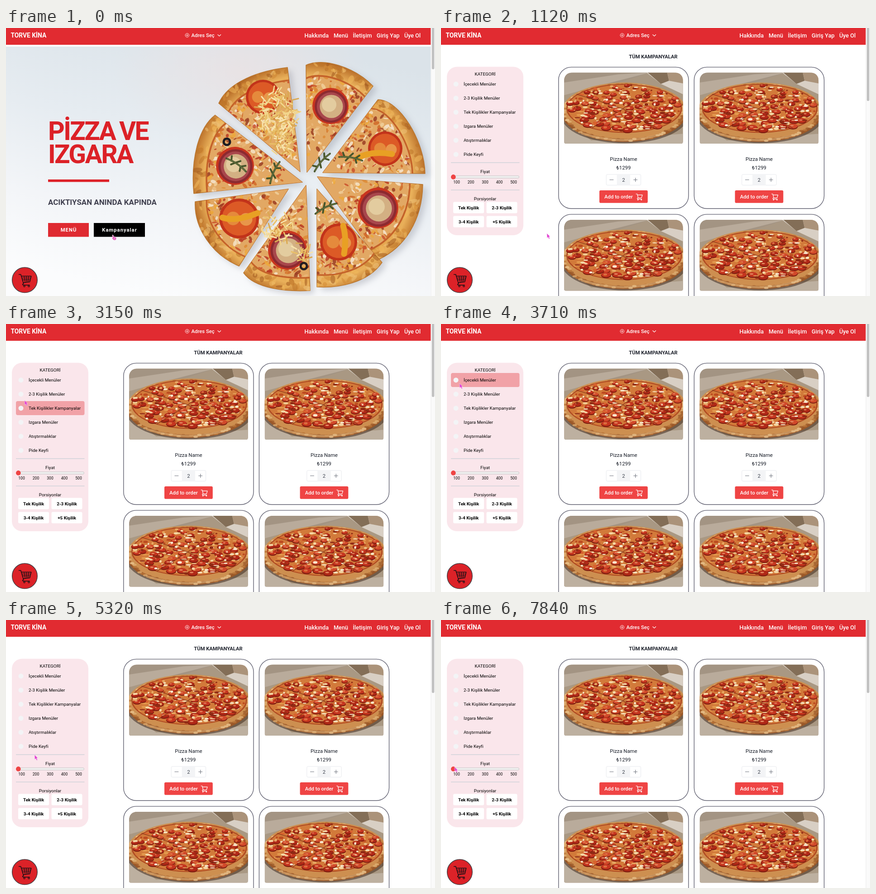
An HTML page for the animation above (7.91 s loop, 948 px wide and 591 px high).

```html
<!DOCTYPE html>
<html lang="tr">
<head>
<meta charset="utf-8">
<title>Pizza menu</title>
<style>
  html, body { margin: 0; width: 100%; height: 100%; overflow: hidden; background: #fff; }
  svg { display: block; width: 948px; height: 591px; font-family: Roboto, Arial, sans-serif; }
  .mid { text-anchor: middle; }
  .med { font-weight: 500; }
  .bold { font-weight: 700; }
  .title { font-weight: 700; font-stretch: 75%; letter-spacing: -2.6px; word-spacing: -3px; }
</style>
</head>
<body>
<svg id="stage" viewBox="0 0 948 591" xmlns="http://www.w3.org/2000/svg"></svg>
<script>
const LOOP = 7910, STEP = 70;
const OPEN_AT = 350, LOADED_AT = 1050;
const RED = '#e12b31', BRIGHT = '#ef4444';

function seeded(seed) {
  return () => (seed = (seed * 16807) % 2147483647) / 2147483647;
}
const repeat = (n, fn) => Array.from({ length: n }, (_, i) => fn(i)).join('');
const pick = (list, rnd) => list[Math.floor(rnd() * list.length)];
const rect = (x, y, w, h, fill, r = 0, more = '') =>
  `<rect x="${x}" y="${y}" width="${w}" height="${h}" rx="${r}" fill="${fill}" ${more}/>`;
const disc = (x, y, r, fill, more = '') =>
  `<circle cx="${x}" cy="${y}" r="${r}" fill="${fill}" ${more}/>`;
const oval = (x, y, rx, ry, fill, more = '') =>
  `<ellipse cx="${x}" cy="${y}" rx="${rx}" ry="${ry}" fill="${fill}" ${more}/>`;
const path = (d, fill, more = '') => `<path d="${d}" fill="${fill}" ${more}/>`;
const line = (d, color, w, more = '') =>
  path(d, 'none', `stroke="${color}" stroke-width="${w}" stroke-linecap="round" stroke-linejoin="round" ${more}`);
const text = (x, y, size, str, cls = '', fill = '#000', more = '') =>
  `<text x="${x}" y="${y}" font-size="${size}" class="${cls}" fill="${fill}" ${more}>${str}</text>`;

// ---- Shared parts ----
function header() {
  const links = [[659.5, 'Hakkında'], [724, 'Menü'], [766.5, 'İletişim'], [819, 'Giriş Yap'], [880, 'Üye Ol']];
  return rect(0, 0, 938.5, 37, RED) +
    text(10.5, 21, 13.8, 'TORVE KİNA', 'bold', '#fff') +
    disc(400.3, 16, 4.2, 'none', 'stroke="#fff" stroke-width=".9"') +
    line('M398.3 16h4M400.3 14v4', '#fff', .9) +
    text(409.5, 20, 11.3, 'Adres Seç', 'med', '#fff') +
    line('M468 14.7l3.3 3.2 3.3-3.2', '#fff', 1.2) +
    links.map(([x, s]) => text(x, 20.5, 12.7, s, 'med', '#fff')).join('');
}

const scrollbar = h => rect(939, 0, 9, 591, '#fafafa') + rect(938.6, 0, .8, 591, '#e6e6e6') +
  rect(941, -4, 5.5, h + 4, '#c1c1c1', 2.7);

function basket() {
  return disc(41.4, 555.8, 27.8, '#dc2228', 'stroke="#4a4045" stroke-width="1.5"') +
    line('M28.5 543.5h4.2l6.2 20.5M33.7 547.2h22l-3.2 12.6-14.6 1.8M38.9 564c-3 .3-3 3 0 3h13', '#151014', 1.5) +
    line('M35 551.3h19.5M36.2 555.4h17.3M40 547.5l2.4 13.5M45 547.5l.7 13M50 547.5l-1.2 12.5', '#151014', 1.1) +
    disc(40.5, 569.3, 1.7, 'none', 'stroke="#151014" stroke-width="1.2"') +
    disc(50.5, 569.3, 1.7, 'none', 'stroke="#151014" stroke-width="1.2"');
}

// ---- Hero ----
// tip, first corner, two curve handles, second corner
const SLICES = [
  [650, 317, 470, 166, 492, 118, 560, 94, 622, 87],
  [665, 318, 663, 82, 700, 64, 770, 86, 811, 128],
  [700, 319, 822, 158, 870, 158, 925, 250, 926, 321],
  [688, 328, 921, 345, 920, 425, 880, 485, 822, 511],
  [687, 355, 831, 517, 800, 562, 735, 574, 687, 571],
  [663, 347, 525, 540, 550, 575, 620, 582, 672, 579],
  [624, 355, 418, 383, 415, 440, 455, 500, 515, 525],
  [655, 340, 415, 365, 408, 290, 425, 220, 462, 192]
];

function wedge(s, k) {
  const p = s.map((v, i) => (s[i % 2] + (v - s[i % 2]) * k).toFixed(1));
  return `M${p[0]} ${p[1]}L${p[2]} ${p[3]}C${p.slice(4).join(' ')}Z`;
}

// A point on the outer curve at u, pulled toward the tip by k.
function along(s, u, k) {
  const v = 1 - u;
  return [0, 1].map(j => {
    const edge = v * v * v * s[2 + j] + 3 * v * v * u * s[4 + j] + 3 * v * u * u * s[6 + j] + u * u * u * s[8 + j];
    return (s[j] + (edge - s[j]) * k).toFixed(1);
  });
}

function slice(s, i) {
  const rnd = seeded(91 + i * 77);
  const spots = ['#d06a28', '#f5e3c6', '#b83a24', '#eda83c', '#f6e6cf', '#9c3f24', '#f0cf9a', '#dc8a35', '#c9502c', '#e9b778'];
  const browns = ['#a55c20', '#efc277', '#d48a36', '#f0b95c', '#bd7529'];
  const blob = (u, k, rx, ry, fill, alpha) => {
    const [x, y] = along(s, u, k);
    return oval(x, y, rx.toFixed(1), ry.toFixed(1), fill,
      `opacity="${alpha}" transform="rotate(${Math.round(rnd() * 180)} ${x} ${y})"`);
  };
  const bits = repeat(170, () => blob(rnd(), .1 + Math.sqrt(rnd()) * .78, 2 + rnd() * 6, 1.2 + rnd() * 3, pick(spots, rnd), .85));
  const bake = repeat(28, () => blob(rnd(), .89 + rnd() * .1, 4 + rnd() * 8, 2 + rnd() * 4, pick(browns, rnd), .55));
  return `<clipPath id="o${i}">${path(wedge(s, 1), '#000')}</clipPath>
    <clipPath id="w${i}">${path(wedge(s, .87), '#000')}</clipPath>` +
    path(wedge(s, 1), 'url(#crust)', 'stroke="#b9762f" stroke-width="1.5" stroke-linejoin="round"') +
    `<g clip-path="url(#o${i})">${bake}</g>` +
    path(wedge(s, .885), '#c4622a') +
    `<g clip-path="url(#w${i})">${path(wedge(s, .87), '#e2a864')}${bits}</g>`;
}

function salami(x, y, r) {
  return disc(x, y, r, '#c9351f') + disc(x + 1, y + 1, r * .9, '#8c2a30') + disc(x + 1, y + 1, r * .78, '#a8474c') +
    disc(x + 2, y + 1, r * .64, '#d3b083') + disc(x - 3, y - 3, r * .4, '#e3cc9f');
}
const tomato = (x, y, r) => disc(x, y, r, '#c2331a') + disc(x, y, r * .86, '#dc5a26') +
  disc(x - r * .3, y, r * .34, '#e58a3c') + disc(x + r * .35, y + 2, r * .32, '#e8964a');

function shreds(cx, cy, rx, ry, n, seed) {
  const rnd = seeded(seed);
  return repeat(n, () => {
    const a = rnd() * 6.28, d = Math.sqrt(rnd());
    const x = cx + Math.cos(a) * d * rx, y = cy + Math.sin(a) * d * ry, b = rnd() * 6.28;
    return line(`M${x.toFixed(1)} ${y.toFixed(1)}l${(Math.cos(b) * 13).toFixed(1)} ${(Math.sin(b) * 13).toFixed(1)}`,
      pick(['#f2d58c', '#e9bf68', '#f7e3ac', '#dba951'], rnd), 3);
  });
}

function leaf(x, y, turn) {
  return `<g transform="translate(${x} ${y}) rotate(${turn})">` +
    line('M-26 3Q0-4 26 2M-14 1l-5-9M-4-1l7-9M-4-1l-6 9M10 0l8-8M10 0l4 9', '#47552c', 4) +
    line('M-24 3Q0-4 25 2', '#77824a', 1.2) + '</g>';
}

function hero() {
  const toppings = tomato(568, 152, 38) + shreds(600, 190, 42, 52, 150, 17) + shreds(612, 255, 25, 34, 50, 23) +
    salami(717, 172, 40) + tomato(838, 266, 38) + salami(506, 304, 42) + tomato(515, 420, 44) +
    salami(822, 397, 45) + salami(622, 490, 43) + tomato(735, 472, 41) +
    shreds(600, 440, 36, 30, 45, 51) + shreds(655, 490, 18, 25, 18, 5) +
    line('M775 288q30-18 78-10M478 418q30 10 78-10M745 436q8 28 2 62', '#e8a024', 13) +
    disc(488, 251, 7, 'none', 'stroke="#1d1c22" stroke-width="5"') +
    disc(658, 525, 7, 'none', 'stroke="#241d20" stroke-width="5"') +
    leaf(510, 300, 35) + leaf(592, 318, -65) + leaf(697, 295, -48) + leaf(762, 286, 10) + leaf(706, 396, -25);
  const button = (x, w, fill, s) => rect(x, 430, w, 30.5, fill) +
    text(x + w / 2 + .5, 448.7, 11.3, s, 'mid bold', '#fff', 'letter-spacing="1"');
  return rect(0, 37, 938.5, 4, '#fff') + rect(0, 41, 938.5, 550, 'url(#wall)') +
    rect(0, 41, 938.5, 550, 'url(#glow)') +
    `<g filter="url(#soft)" opacity=".38" transform="translate(9 7)">${SLICES.map(s => path(wedge(s, 1), '#8b8f9c')).join('')}</g>` +
    SLICES.map(slice).join('') + toppings +
    text(93, 247, 57, 'PİZZA VE', 'title', '#dc2127') + text(93, 297.5, 57, 'IZGARA', 'title', '#dc2127') +
    rect(93, 334, 135, 5.5, '#dd2229') +
    text(93, 390, 16.9, 'ACIKTIYSAN ANINDA KAPINDA', 'bold', '#414150') +
    button(93, 90, '#df2a31', 'MENÜ') + button(194, 113, '#000', 'Kampanyalar');
}

// ---- Campaign page ----
const ROWS = ['İçecekli Menüler', '2-3 Kişilik Menüler', 'Tek Kişilikler Kampanyalar', 'Izgara Menüler', 'Atıştırmalıklar', 'Pide Keyfi'];

function sidebar() {
  const rows = ROWS.map((s, i) => disc(33, 123.7 + i * 31, 5.5, '#f3f4f6') + text(50, 127.2 + i * 31, 9.9, s)).join('');
  const ticks = [100, 200, 300, 400, 500].map((n, i) => text(34.5 + i * 31.5, 342.7, 8.5, n, 'mid')).join('');
  const sizes = ['Tek Kişilik', '2-3 Kişilik', '3-4 Kişilik', '+5 Kişilik'].map((s, i) => {
    const x = 27 + (i % 2) * 73.5, y = 383.5 + (i >> 1) * 31;
    return rect(x, y, 68, 25, '#fff', 3) + text(x + 34, y + 16, 9.9, s, 'mid bold');
  }).join('');
  return rect(13, 85.5, 169, 371.5, '#fae6eb', 22) +
    rect(22, 108, 151.5, 31, '#f1a2a7', 4, 'id="hover"') +
    text(97.5, 104.5, 9.9, 'KATEGORİ', 'mid') + rows +
    rect(22, 296, 151.5, 1.6, '#d3d4da') + text(97.5, 319.5, 9.9, 'Fiyat', 'mid') +
    rect(22.5, 326, 150, 5, '#f1f1f1', 2.5, 'stroke="#b9b9b9" stroke-width=".8"') +
    disc(27.3, 328.4, 5.3, BRIGHT) + ticks +
    rect(22, 356.5, 151.5, 1.6, '#d3d4da') + text(97.5, 380, 9.9, 'Porsiyonlar', 'mid') + sizes;
}

function card(cx, w, y, photo) {
  const left = cx - 38.2, sign = '#70757f';
  return `<g transform="translate(0 ${y})">` +
    rect(cx - w / 2, .7, w, 311.8, '#fff', 28, 'stroke="#626272" stroke-width="1.4"') +
    (photo ? `<use href="#photo" x="${cx - 131.5}" y="12.5"/>` : '') +
    text(cx, 207, 11.3, 'Pizza Name', 'mid', '#161b26') + text(cx, 226.5, 11.3, '₺1299', 'mid', '#161b26') +
    rect(left, 237.3, 76.4, 23.6, '#fff', 2.5, 'stroke="#e5e7eb" stroke-width=".9"') +
    rect(left + 23.5, 237.3, 29.4, 23.6, '#f3f4f6') +
    line(`M${left + 7.7} 249h8M${left + 60.5} 249h8M${left + 64.5} 245v8`, sign, 1.1) +
    text(cx, 253, 11.3, '2', 'mid', '#3c424d') +
    rect(cx - 53.4, 272.3, 106.8, 27.8, BRIGHT, 2.8) +
    text(cx - 42.3, 290, 11.3, 'Add to order', 'med', '#fff') +
    line(`M${cx + 27.5} 280.3h2.6l2.3 8.6h7.2l2-6.4h-10.6M${cx + 32.4} 288.9c-2.8.2-2.8 2.7 0 2.7h8`, '#fff', 1.2) +
    disc(cx + 31.8, 293.3, 1.2, '#fff') + disc(cx + 39.4, 293.3, 1.2, '#fff') + '</g>';
}

function cards(centers, w, photo) {
  return [85.7, 410.2].map(y => centers.map(cx => card(cx, w, y, photo)).join('')).join('');
}

function photo() {
  const rnd = seeded(4242);
  // Even spread over the cheese, by the golden angle, with a little jitter.
  const scatter = (n, draw) => repeat(n, i => {
    const a = i * 2.39996 + rnd() * .3, d = Math.sqrt((i + .3 + rnd() * .4) / n);
    return draw(+(133 + Math.cos(a) * d * 124).toFixed(1), +(78 + Math.sin(a) * d * 51).toFixed(1));
  });
  const flecks = (n, colors) => scatter(n, (x, y) =>
    oval(x, y, (1.5 + rnd() * 5).toFixed(1), (.8 + rnd() * 2).toFixed(1), pick(colors, rnd)));
  const meat = scatter(74, (x, y) => {
    const k = .6 + y / 170;
    return oval(x, y + 1.2, (8.6 * k).toFixed(1), (4.8 * k).toFixed(1), '#7c1c10') +
      oval(x, y, (8 * k).toFixed(1), (4 * k).toFixed(1), pick(['#c5351f', '#b02817', '#d1492a'], rnd)) +
      oval(x - 2, y - 1, 3 * k, 1.1 * k, '#e58a62');
  });
  const bake = repeat(90, i => {
    const a = i / 90 * 6.283, k = .97 + rnd() * .06;
    return oval((133 + Math.cos(a) * 132 * k).toFixed(1), (88 + Math.sin(a) * 61 * k).toFixed(1), 5, 2.5,
      pick(['#dfb075', '#9c5a2a', '#ecc993', '#b87539'], rnd), 'opacity=".75"');
  });
  return `<clipPath id="frame">${path('M20 0H243Q263 0 263 20V152Q263 157 258 157H5Q0 157 0 152V20Q0 0 20 0Z', '#000')}</clipPath>
    <g id="photo"><g clip-path="url(#frame)">` +
    rect(0, 0, 263, 157, '#a99883') +
    path('M0 0H190L110 26 0 48Z', '#a39483') + path('M0 22L120 4 190 0 80 28 0 50Z', '#b9ab9b') +
    path('M182 0H263V48L214 25Z', '#d8cfc4') + path('M185 0H228L232 18 214 25Z', '#836e57') +
    path('M228 0H263V24L232 18Z', '#ab937a') + path('M0 100L60 150 263 135V157H0Z', '#bdb0a0') +
    oval(134, 95, 140, 61, '#4c3526', 'opacity=".6"') +
    oval(133, 88, 138, 65, '#9a5828') + oval(133, 84, 137, 62, '#cd8f50') + bake +
    oval(133, 79, 128, 54, '#b04a22') + oval(133, 79, 125, 52, '#d27a3a') +
    flecks(150, ['#f2cf98', '#f7e2bd', '#e39a4e', '#bd4a20']) + meat +
    flecks(150, ['#f5d8a6', '#f9ead0', '#e8a964', '#8f2b14', '#d9622e']) +
    line('M28 48Q70 60 130 80L205 122M188 38L130 80 62 122', '#7c2f16', 1.6, 'opacity=".7"') +
    line('M40 134Q130 164 222 134', '#e6bb82', 5, 'opacity=".55"') + '</g></g>';
}

const page = bar => rect(0, 0, 948, 591, '#fff') + scrollbar(bar);
const centers = Array.from({ length: 5 }, (_, i) => 266.7 + i * 143.15);

document.getElementById('stage').innerHTML = `
  <defs>
    <linearGradient id="wall" x1=".7" y1="0" x2=".35" y2="1">
      <stop offset="0" stop-color="#dbe3e9"/><stop offset=".4" stop-color="#e6ecf1"/>
      <stop offset=".72" stop-color="#f3f5f8"/><stop offset="1" stop-color="#fbfcfd"/>
    </linearGradient>
    <radialGradient id="glow" cx=".55" cy=".1" r=".3">
      <stop offset="0" stop-color="#ebe2e3" stop-opacity=".8"/><stop offset="1" stop-color="#ebe2e3" stop-opacity="0"/>
    </radialGradient>
    <radialGradient id="crust" gradientUnits="userSpaceOnUse" cx="668" cy="335" r="262">
      <stop offset=".7" stop-color="#d98c35"/><stop offset=".88" stop-color="#e9b05a"/><stop offset="1" stop-color="#b66a25"/>
    </radialGradient>
    <filter id="soft"><feGaussianBlur stdDeviation="7"/></filter>
    ${photo()}
  </defs>
  <g id="home">${page(91)}${hero()}</g>
  <g id="list">${page(161)}
    ${text(469, 66.7, 11.2, 'TÜM KAMPANYALAR', 'mid bold', '#20242e')}
    <g id="empty">${scrollbar(300)}${cards(centers, 131, false)}</g>
    <g id="full">${cards([403.4, 703], 287.2, true)}</g>
    ${sidebar()}
  </g>
  ${header()}${basket()}
  ${path('M0 0L.4 10 2.6 8 4.6 12 6.3 11.1 4.4 7.3 7 7Z', '#e13fd2', 'id="arrow" stroke="#f7d3f3" stroke-width=".6"')}
  <g id="hand">${path('M0 1Q0-1 1.5 0L3.6 4 8 5.2Q9.5 6 8.8 9L7 11.5H2.8L-.8 7.2Q-1 5.5.8 6Z', '#e356bb', 'stroke="#fff" stroke-width=".8"')}
    ${line('M3 7.2l1 1.6M5.2 7.2l.8 1.6', '#fff', .8)}</g>`;

// ---- Motion: time, x, y of the pointer tip ----
const TRACK = [
  [0, 235, 456.5], [350, 235, 456], [700, 234, 453], [1300, 234, 453], [2000, 62, 362], [2170, 52, 351],
  [2560, 45, 300], [3300, 40, 135], [3710, 41, 131], [4130, 42, 126], [4620, 52, 204],
  [5250, 62, 295], [6090, 76, 324], [6700, 60, 326], [7300, 30, 326], [7910, 30, 324]
];

function pointer(t) {
  const i = Math.max(1, TRACK.findIndex(k => k[0] >= t));
  const [t0, x0, y0] = TRACK[i - 1], [t1, x1, y1] = TRACK[i];
  const k = Math.max(0, (t - t0) / (t1 - t0));
  return [x0 + (x1 - x0) * k, y0 + (y1 - y0) * k];
}

const el = id => document.getElementById(id);
const show = (id, on) => el(id).setAttribute('display', on ? 'inline' : 'none');
const start = performance.now();

function draw() {
  const t = Math.floor(((performance.now() - start) % LOOP) / STEP) * STEP;
  const home = t < OPEN_AT, [x, y] = pointer(t);
  show('home', home);
  show('list', !home);
  show('empty', t < LOADED_AT);
  show('full', t >= LOADED_AT);
  show('hand', home);
  show('arrow', !home);
  for (const id of ['hand', 'arrow']) el(id).setAttribute('transform', `translate(${x} ${y})`);

  // The highlight trails the pointer by one step.
  const [hx, hy] = pointer(Math.max(0, t - STEP));
  const row = Math.floor((hy - 108) / 31);
  const over = hx > 22 && hx < 173 && row >= 0 && row < ROWS.length;
  show('hover', over);
  if (over) el('hover').setAttribute('y', 108 + row * 31);
  requestAnimationFrame(draw);
}
draw();
</script>
</body>
</html>
```
